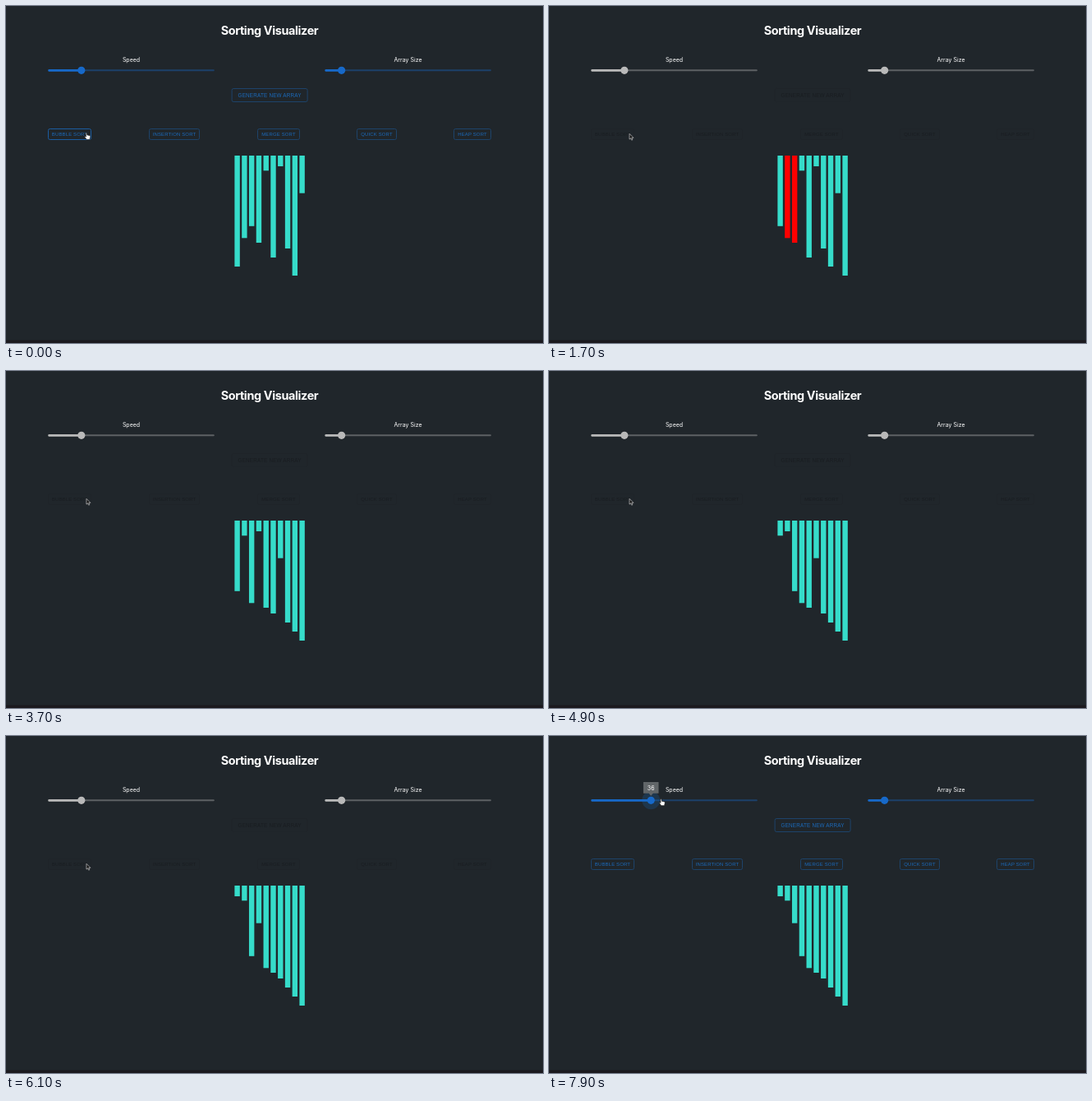
Recreate the animation shown at these times as an HTML page. Size 654 px wide and 410 px high, loop 8 s.

```html
<!DOCTYPE html>
<html lang="en">
<head>
<meta charset="utf-8">
<title>Sorting Visualizer</title>
<style>
  html, body { margin: 0; width: 100%; height: 100%; overflow: hidden; background: #20262b; }
  svg { display: block; width: 654px; height: 410px; }
  text { text-anchor: middle; }
  .ui { font-family: Inter, "Open Sans", sans-serif; fill: #fff; }
  .title { font-size: 14.4px; font-weight: 700; letter-spacing: -.025em; }
  .name { font-size: 7px; }
  .btn text { font-family: "Liberation Sans", Arial, sans-serif; font-size: 5.95px; letter-spacing: .0286em; }
  .btn .big { font-size: 6.35px; }
  .btn rect { fill: none; stroke-width: 1; }
</style>
</head>
<body>
<svg id="stage" viewBox="0 0 654 410">
  <rect width="654" height="410" fill="#20262b"/>
  <rect y="406.5" width="654" height="3.5" fill="#1b191e"/>
  <text class="ui title" x="321" y="34.7">Sorting Visualizer</text>
  <text class="ui name" x="152.5" y="68.4">Speed</text>
  <text class="ui name" x="489.5" y="68.4">Array Size</text>
</svg>
<script>
const LOOP = 8000, TICK = 100;
const ENABLE_AT = 6800;
const TEAL = '#36dcca', RED = '#ff0000', BLUE = '#1769c9', GREY = '#b9b9b9';
const HEIGHTS = [135, 100.3, 85.8, 106, 18.3, 124, 13, 113, 146, 45.7];

// tick:comparisons finished, "r" = next pair is highlighted
const STEPS = (
  '0:0 2:1 3:1r 4:2 5:3 6:3r 7:4 8:5 9:5r 10:6 12:7r 13:8 15:9 17:10r 18:11 19:12 ' +
  '21:12r 22:13 23:14 24:15r 25:16 27:17r 28:18 30:19 31:19r 32:20 33:21 35:22r ' +
  '36:23 37:24 39:25r 40:26 42:27r 43:28 46:30 48:31r 49:32 51:33r 52:34 53:35 ' +
  '54:35r 55:36 56:36r 57:37r 58:38 60:39r 61:40 64:42 65:42r 66:43 67:44r 68:45'
).split(' ').map(s => {
  const [tick, rest] = s.split(':');
  return { at: tick * TICK, done: parseInt(rest), hot: rest.endsWith('r') };
});

// Pointer path: time, x, y
const PATH = [
  [7000, 98, 158], [7100, 97, 150], [7200, 95, 133], [7300, 93, 112], [7400, 92, 93],
  [7500, 92, 82], [7600, 93, 80], [7700, 103, 80], [7800, 119, 80], [7900, 136.5, 80.3]
];
const SPEED = [[7600, 20], [7700, 22], [7800, 28], [7900, 36]];

const stage = document.getElementById('stage');

function add(tag, attrs, parent = stage) {
  const el = document.createElementNS('http://www.w3.org/2000/svg', tag);
  set(el, attrs);
  parent.appendChild(el);
  return el;
}

function set(el, attrs) {
  for (const key in attrs) el.setAttribute(key, attrs[key]);
}

function along(keys, t, col) {
  if (t <= keys[0][0]) return keys[0][col];
  for (let i = 1; i < keys.length; i++) {
    const a = keys[i - 1], b = keys[i];
    if (t <= b[0]) return a[col] + (b[col] - a[col]) * (t - a[0]) / (b[0] - a[0]);
  }
  return keys[keys.length - 1][col];
}

const clamp = v => Math.max(0, Math.min(1, v));

function mix(a, b, p) {
  return `rgb(${a.map((v, i) => Math.round(v + (b[i] - v) * p))})`;
}

// Bubble sort, one snapshot per comparison
const pairs = [], snaps = [HEIGHTS];
for (let end = HEIGHTS.length - 1; end > 0; end--) {
  for (let i = 0; i < end; i++) {
    const next = snaps[snaps.length - 1].slice();
    if (next[i] > next[i + 1]) [next[i], next[i + 1]] = [next[i + 1], next[i]];
    pairs.push(i);
    snaps.push(next);
  }
}

function makeSlider(x) {
  const halo = add('circle', { cy: 78.3, r: 0, fill: '#1976d2', opacity: .2 });
  const rail = add('rect', { x, y: 77.3, width: 202.5, height: 2, rx: 1, opacity: .4 });
  const track = add('rect', { x, y: 76.9, height: 2.8, rx: 1.3 });
  const thumb = add('circle', { cy: 78.3, r: 4.6 });
  return (value, color, haloSize) => {
    const cx = x + 2.025 * value;
    for (const el of [rail, track, thumb]) el.setAttribute('fill', color);
    track.setAttribute('width', cx - x);
    thumb.setAttribute('cx', cx);
    set(halo, { cx, r: haloSize });
    return cx;
  };
}

function makeButton(label, x, y, width, height, big) {
  const g = add('g', { class: 'btn' });
  const box = add('rect', { x: x + .5, y: y + .5, width: width - 1, height: height - 1, rx: 2 }, g);
  const text = add('text', { x: x + width / 2, y: y + height / 2 + 2.1 }, g);
  if (big) text.setAttribute('class', 'big');
  text.textContent = label;
  return { box, text };
}

const speed = makeSlider(51.3);
const size = makeSlider(388.4);

const buttons = [
  makeButton('BUBBLE SORT', 51, 149, 53, 14),
  makeButton('INSERTION SORT', 174, 149, 62, 14),
  makeButton('MERGE SORT', 306, 149, 52, 14),
  makeButton('QUICK SORT', 427, 149, 49, 14),
  makeButton('HEAP SORT', 545, 149, 46, 14),
  makeButton('GENERATE NEW ARRAY', 274.6, 100, 93, 17, true)
];

const bars = HEIGHTS.map((h, i) => add('rect', { x: 278.4 + 8.78 * i, y: 182, width: 6.4 }));

const tip = add('g', {});
add('path', { d: 'M-9.3 -22.3H9.3V-8.5H2.6L0 -5.6L-2.6 -8.5H-9.3Z', fill: '#616669' }, tip);
const tipText = add('text', { class: 'ui name', y: -12.8 }, tip);

const arrow = add('path', {
  d: 'M0 -2.6V4.2L1.6 2.8L2.7 5.2L3.8 4.7L2.7 2.4H4.9Z',
  fill: '#111', stroke: '#e8e8e8', 'stroke-width': .6
});
const hand = add('path', {
  d: 'M-.9 -3.4Q-.2 -4.3 .4 -3.3L.9 -1L4 -.4Q5 0 4.7 1.4L4 4.4H.3L-2 1.5Q-2.4 .4 -1.2 .5L-.4 1.1Z',
  fill: '#fff', stroke: '#111', 'stroke-width': .6
});

const LINE_ON = [29, 67, 106], LINE_HOT = [27, 92, 160], LINE_OFF = [31, 36, 41];

function draw(t) {
  const step = STEPS.filter(s => s.at <= t).pop();
  const hotBar = step.hot ? pairs[step.done] : -9;
  bars.forEach((bar, i) => set(bar, {
    height: snaps[step.done][i],
    fill: i === hotBar || i === hotBar + 1 ? RED : TEAL
  }));

  const active = t < 100 || t >= ENABLE_AT;
  const off = t < ENABLE_AT ? clamp((t - 20) / 250) : 1 - clamp((t - ENABLE_AT + 130) / 230);
  buttons.forEach(({ box, text }, i) => {
    const on = i === 0 && t < ENABLE_AT ? LINE_HOT : LINE_ON;
    box.setAttribute('stroke', mix(on, LINE_OFF, off));
    text.setAttribute('fill', active ? '#1b6abb' : '#191d21');
  });

  const value = Math.round(along(SPEED, t, 1));
  const color = active ? BLUE : GREY;
  const halo = t < 7400 ? 0 : t < 7600 ? 8.3 : 11;
  const cx = speed(value, color, halo);
  size(10, color, 0);

  const grow = clamp((t - 7340) / 150);
  tip.setAttribute('transform', `translate(${cx} 78.3) scale(${grow})`);
  tipText.textContent = value;

  const at = `translate(${along(PATH, t, 1)} ${along(PATH, t, 2)})`;
  const pointing = t < 100 || (t >= 6900 && t < 7200) || t >= 7400;
  set(arrow, { transform: at, visibility: pointing ? 'hidden' : 'visible' });
  set(hand, { transform: at, visibility: pointing ? 'visible' : 'hidden' });
}

const start = performance.now();
function frame() {
  const t = (performance.now() - start) % LOOP;
  draw(Math.floor(t / TICK) * TICK);
  requestAnimationFrame(frame);
}
frame();
</script>
</body>
</html>
```
